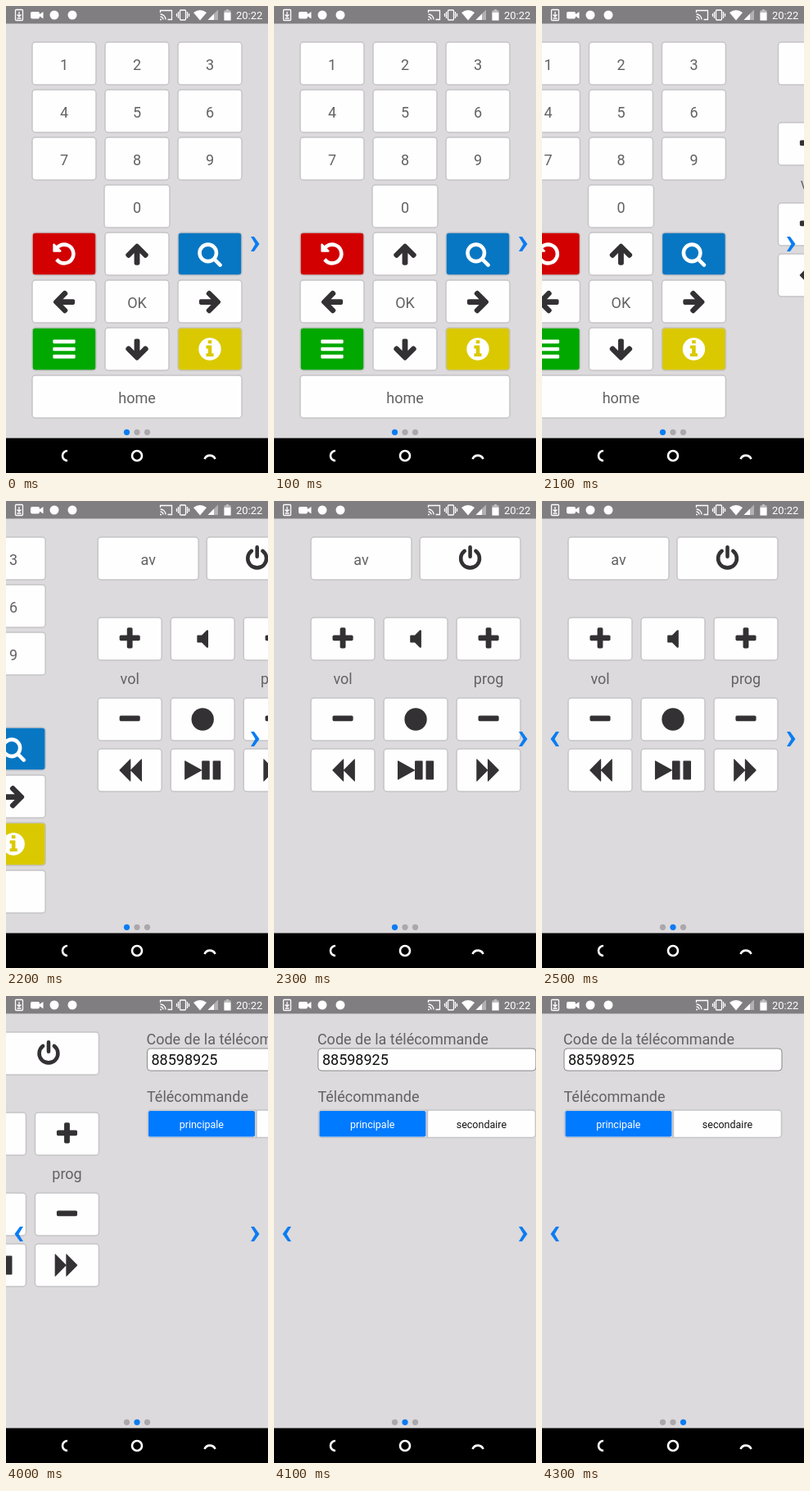
These frames come from a looping animation (320 px wide and 569 px high, 5 s). An HTML page:

```html
<!DOCTYPE html>
<html lang="fr">
<head>
<meta charset="utf-8">
<title>Télécommande</title>
<style>
  html, body { margin: 0; width: 100%; height: 100%; overflow: hidden; background: #dcdadc; }
  svg { display: block; width: 100%; height: 100%; }
  text { font: 18px Roboto, sans-serif; fill: #636163; }
  .mid { text-anchor: middle; }
  .small { font-size: 12.5px; }
  .key { stroke: #c5c4c6; stroke-width: 1.5; }
</style>
</head>
<body>
<svg viewBox="0 0 320 569">
  <rect width="320" height="569" fill="#dcdadc"/>
  <g id="pages"></g>
  <g fill="#0a7cf2">
    <path id="prev" d="M21 281h-4l-6.500 9 6.500 9h4l-5.500-9z"/>
    <path id="next" d="M299 281h4l6.500 9-6.500 9h-4l5.500-9z"/>
  </g>
  <g id="dots"></g>

  <rect width="320" height="21.500" fill="#807e80"/>
  <g fill="none" stroke="#fff" stroke-width="1.300">
    <rect x="11.500" y="4.500" width="9" height="13" rx="1"/>
    <path d="M16 7v5M13.500 10.500l2.500 2.500 2.500-2.500M13.500 15h5"/>
    <path d="M188.500 8V5.500h14v11h-5M188.500 10a6.500 6.500 0 0 1 6.500 6.500M188.500 13a3.500 3.500 0 0 1 3.500 3.500"/>
    <rect x="212.500" y="5" width="7" height="12" rx="1"/>
    <path d="M210.500 7v8M208.500 9v4M221.500 7v8M223.500 9v4"/>
  </g>
  <g fill="#fff">
    <rect x="30" y="7" width="11" height="8.500" rx="2"/>
    <path d="M41 10l4.500-3v8.500l-4.500-3z"/>
    <circle cx="59" cy="11" r="5.500"/>
    <circle cx="81" cy="11" r="5.500"/>
    <circle cx="189" cy="16.500" r="1"/>
    <path d="M229 8q8-6 16 0l-8 9.500z"/>
    <path d="M259 4.500v12.500h-12.500z" opacity=".4"/>
    <path d="M254 9.500v7.500h-7.500z"/>
    <path d="M266.500 5.500h2.500v-1.500h3v1.500h2.500v12h-8z" opacity=".5"/>
    <path d="M266.500 8h8v9.500h-8z"/>
    <text x="281" y="15.500" style="font-size:13px;fill:#fff">20:22</text>
  </g>

  <rect y="526.500" width="320" height="43" fill="#000"/>
  <g fill="none" stroke="#fff" stroke-width="2.600">
    <path d="M75 542a6 6 0 0 0 0 12"/>
    <circle cx="160" cy="548" r="6"/>
    <path d="M242.500 552a7 7 0 0 1 13 0"/>
  </g>
</svg>
<script>
const $ = id => document.getElementById(id);
const DARK = '#333133', WHITE = '#fefefe';
const COLS = [71, 160, 249];

// Icons are drawn on a 1792-unit square
const arrow = turn => `<path transform="rotate(${turn} 896 928)" d="M1675 971q0 51-37 90l-75 75q-38 38-91 38-54 0-90-38l-294-293v704q0 52-37.500 84.500t-90.500 32.500h-128q-53 0-90.500-32.500t-37.500-84.500v-704l-294 293q-36 38-90 38t-90-38l-75-75q-38-38-38-90 0-53 38-91l651-651q35-37 90-37 54 0 91 37l651 651q37 39 37 91z"/>`;
const bar = (x, y, w, h, r) => `<rect x="${x}" y="${y}" width="${w}" height="${h}" rx="${r}"/>`;
const line = d => `<path d="${d}" fill="none" stroke="currentColor" stroke-width="256" stroke-linecap="round"/>`;
const rewind = '<path d="M1683 141q19-19 32-13t13 32v1472q0 26-13 32t-32-13l-710-710q-9-9-13-19v710q0 26-13 32t-32-13l-710-710q-19-19-19-45t19-45l710-710q19-19 32-13t13 32v710q4-10 13-19z"/>';
const minus = bar(192, 640, 1408, 384, 96);
const disc = '<circle cx="896" cy="896" r="768"/>';
const ICONS = {
  up: arrow(0), right: arrow(90), down: arrow(180), left: arrow(270),
  undo: '<path d="M1664 896q0 156-61 298t-164 245-245 164-298 61q-172 0-327-72.500t-264-204.500q-7-10-6.500-22.500t8.500-20.500l137-138q10-9 25-9 16 2 23 12 73 95 179 147t225 52q104 0 198.500-40.500t163.500-109.500 109.500-163.500 40.500-198.500-40.500-198.500-109.500-163.500-163.500-109.500-198.500-40.500q-98 0-188 35.500t-160 101.500l137 138q31 30 14 69-17 40-59 40h-448q-26 0-45-19t-19-45v-448q0-42 40-59 39-17 69 14l130 129q107-101 244.500-156.500t284.500-55.500q156 0 298 61t245 164 164 245 61 298z"/>',
  search: line('M1344 832a576 576 0 1 1-1152 0 576 576 0 1 1 1152 0M1190 1254l410 410'),
  bars: [256, 768, 1280].map(y => bar(128, y, 1536, 256, 64)).join(''),
  info: disc + '<path fill="#dac900" d="M640 640h384v544h128v224h-512v-224h128v-320h-128zM768 288h256v224h-256z"/>',
  power: line('M512 384a640 640 0 1 0 768 0M896 128v640'),
  minus, plus: minus + bar(704, 128, 384, 1408, 96),
  mute: '<path d="M1280 352v1088q0 26-19 45t-45 19-45-19l-333-333h-262q-26 0-45-19t-19-45v-384q0-26 19-45t45-19h262l333-333q19-19 45-19t45 19 19 45z"/>',
  disc, rewind,
  forward: `<g transform="matrix(-1 0 0 1 1792 0)">${rewind}</g>`,
  play: '<path d="M1576 927l-1328 738q-23 13-39.500 3t-16.500-36v-1472q0-26 16.500-36t39.500 3l1328 738q23 13 23 31t-23 31z"/>',
  pause: bar(128, 128, 640, 1536, 64) + bar(1024, 128, 640, 1536, 64),
};

const icon = (name, x, y, color = DARK, scale = .0178) =>
  `<g transform="translate(${x} ${y}) scale(${scale}) translate(-896 -896)" fill="${color}" color="${color}">${ICONS[name]}</g>`;
const text = (s, x, y, cls = 'mid', fill = '#636163') =>
  `<text x="${x}" y="${y}" class="${cls}" style="fill:${fill}">${s}</text>`;
const box = (x, y, w, fill = WHITE) =>
  `<rect class="key" x="${x - w / 2}" y="${y - 26}" width="${w}" height="52" rx="4" fill="${fill}"/>`;
const label = (s, x, y, w = 78) => box(x, y, w) + text(s, x, y + 7.5);
const button = (name, x, y, fill = WHITE, w = 78) =>
  box(x, y, w, fill) + icon(name, x, y, fill === WHITE ? DARK : '#fff');
const row = (names, y, fills = []) => names.map((n, i) => button(n, COLS[i], y, fills[i])).join('');

let keypad = '';
for (let n = 1; n < 10; n++) keypad += label(n, COLS[(n - 1) % 3], 70 + 58 * Math.floor((n - 1) / 3));
keypad += label(0, 160, 244, 80)
  + row(['undo', 'up', 'search'], 302, ['#d20000', WHITE, '#0777c3'])
  + button('left', 71, 360) + label('OK', 160, 360) + button('right', 249, 360)
  + row(['bars', 'down', 'info'], 418, ['#00a800', WHITE, '#dac900'])
  + label('home', 160, 476, 256);

const media = label('av', 93.5, 70, 123) + button('power', 226.5, 70, WHITE, 123)
  + row(['plus', 'mute', 'plus'], 168)
  + text('vol', 71, 222.5) + text('prog', 249, 222.5)
  + row(['minus', 'disc', 'minus'], 266)
  + button('rewind', 71, 328) + box(160, 328, 78) + button('forward', 249, 328)
  + icon('play', 148.5, 328, DARK, .015) + icon('pause', 170.5, 328, DARK, .015);

const settings = text('Code de la télécommande', 26, 58.5, '')
  + `<rect x="27" y="64" width="266" height="27" rx="4" fill="${WHITE}" stroke="#8a888a"/>`
  + text('88598925', 32, 84, '', '#111')
  + text('Télécommande', 26.5, 128.5, '')
  + `<rect class="key" x="27.500" y="139" width="265" height="33.500" rx="4" fill="${WHITE}"/>
     <path d="M160 139v33.500" class="key" style="stroke-width:2.500"/>
     <rect x="28.500" y="140" width="130" height="31.500" rx="2" fill="#007aff"/>`
  + text('principale', 93.3, 160.5, 'mid small', '#fff')
  + text('secondaire', 226.5, 160.5, 'mid small', '#111');

$('pages').innerHTML = [keypad, media, settings]
  .map((page, i) => `<g transform="translate(${320 * i} 0)">${page}</g>`).join('');
$('dots').innerHTML = [147.5, 160, 172.5].map(x => `<circle cx="${x}" cy="519.300" r="3.600"/>`).join('');

// CSS "ease": cubic-bezier(.25, .1, .25, 1)
function ease(x) {
  if (x <= 0 || x >= 1) return x <= 0 ? 0 : 1;
  const curve = (s, a, b) => 3 * (1 - s) ** 2 * s * a + 3 * (1 - s) * s * s * b + s ** 3;
  let lo = 0, hi = 1;
  for (let i = 0; i < 24; i++) {
    const s = (lo + hi) / 2;
    if (curve(s, .25, .25) < x) lo = s; else hi = s;
  }
  return curve(lo, .1, 1);
}

const start = performance.now();
function draw(now) {
  const t = Math.floor(Math.max(0, now - start) % 5000 / 100) * 100;
  const shift = 320 * (ease((t - 2047) / 339) + ease((t - 3905) / 300));
  const page = (t >= 2500) + (t >= 4300);
  $('pages').setAttribute('transform', `translate(${-shift} 0)`);
  $('prev').style.display = page > 0 ? '' : 'none';
  $('next').style.display = page < 2 ? '' : 'none';
  [...$('dots').children].forEach((dot, i) => dot.setAttribute('fill', i === page ? '#0a7cf2' : '#aaa8aa'));
  requestAnimationFrame(draw);
}
draw(start);
</script>
</body>
</html>
```
